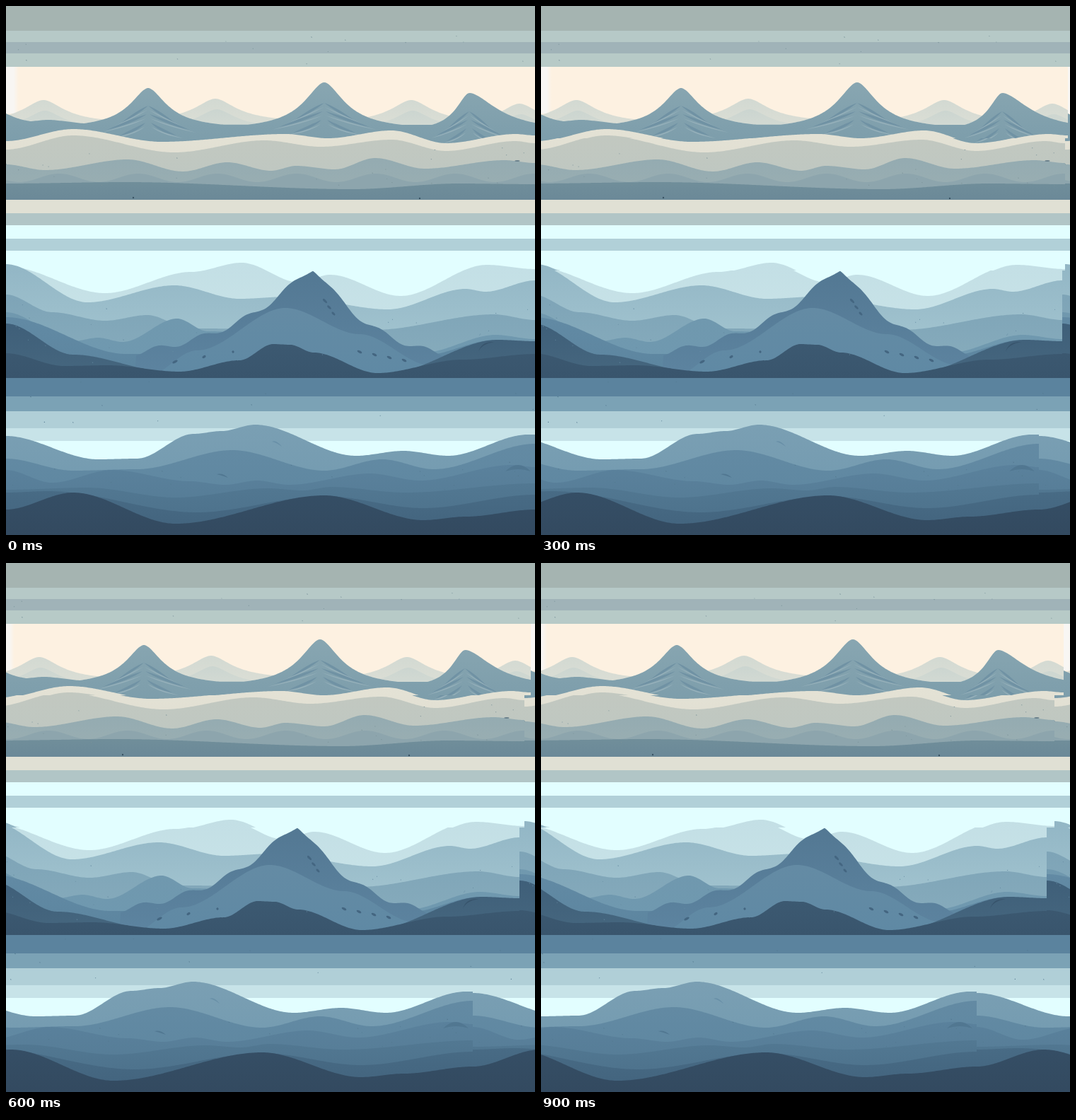
Animation of 748x748 px, one loop 1000 ms. Source, as an HTML page with a canvas:

```html
<!DOCTYPE html>
<html lang="en">
<head>
<meta charset="utf-8">
<title>Layered hills</title>
<style>
html, body { margin: 0; width: 100%; height: 100%; overflow: hidden; background: #a5b4b1; }
canvas { display: block; width: 748px; height: 748px; }
</style>
</head>
<body>
<canvas id="stage" width="748" height="748"></canvas>
<script>
const SIZE = 748, STRIP = SIZE / 4, TAU = Math.PI * 2;
const view = document.getElementById('stage').getContext('2d');
const scene = document.createElement('canvas');
scene.width = scene.height = SIZE;
const g = scene.getContext('2d');

let seed = 41;
const rnd = () => (seed = (seed * 16807) % 2147483647) / 2147483647;

function shade(top, bottom, a, b) {
  const fill = g.createLinearGradient(0, a, 0, b);
  fill.addColorStop(0, top);
  fill.addColorStop(1, bottom);
  return fill;
}

// Stacked flat bands: each starts where the previous one ends.
function bands(y, ...list) {
  for (const [end, color] of list) {
    g.fillStyle = color;
    g.fillRect(0, y, SIZE, end - y);
    y = end;
  }
}

// Height function eased between crests and troughs, given as "x,y x,y ...".
function wave(text) {
  const p = text.split(' ').map(s => s.split(',').map(Number));
  return x => {
    const i = p.findIndex(q => q[0] >= x);
    if (i < 0) return p[p.length - 1][1];
    if (i === 0) return p[0][1];
    const [x0, y0] = p[i - 1], [x1, y1] = p[i];
    const t = (x - x0) / (x1 - x0);
    return y0 + (y1 - y0) * t * t * (3 - 2 * t);
  };
}

// Bell-shaped summit; left and right set how wide each flank is.
function peak(cx, top, height, left, right = left, power = 1.8) {
  return x => {
    const d = Math.abs(x - cx) / (x < cx ? left : right);
    return top + height * (1 - 1 / (1 + d ** power));
  };
}

const highest = (...fns) => x => Math.min(...fns.map(f => f(x)));

function ridge(base, top, bottom, height) {
  const fn = typeof height === 'string' ? wave(height) : height;
  let crest = base;
  g.beginPath();
  g.moveTo(0, base);
  for (let x = 0; x <= SIZE; x += 2) {
    const y = Math.min(fn(x), base);
    crest = Math.min(crest, y);
    g.lineTo(x, y);
  }
  g.lineTo(SIZE, base);
  g.fillStyle = shade(top, bottom, crest, base);
  g.fill();
}

function streak(color, x, y, cx, cy, u, v, w) {
  g.beginPath();
  g.moveTo(x, y);
  g.quadraticCurveTo(cx, cy - w, u, v);
  g.quadraticCurveTo(cx, cy + w, x, y);
  g.fillStyle = color;
  g.fill();
}

function pebble(color, x, y, rx, ry, turn = 0.5) {
  g.beginPath();
  g.ellipse(x, y, rx, ry, turn, 0, TAU);
  g.fillStyle = color;
  g.fill();
}

function specks(count, y, h, color) {
  for (let i = 0; i < count; i++) {
    pebble(color, rnd() * SIZE, y + rnd() * h, 0.5 + rnd() * 0.4, 0.5);
  }
}

// Creases fanning out below a summit, dark and light in turn.
function folds(x, y, k) {
  for (const side of [-1, 1]) {
    for (let i = 0; i < 6; i++) {
      const reach = side * k * (40 + 9 * (i % 4)), drop = y + 25 + 6 * i;
      streak(i % 2 ? '#97b1bb' : '#7092a4', x + side * i, drop,
        x + reach * 0.4, drop + 10, x + reach, drop + 26 - 2 * i, i % 2 ? 1.5 : 4);
    }
  }
}

function paintPeaks() {
  bands(0, [35, '#a5b4b1'], [51, '#b6c9c7'], [67, '#a0b3b8'], [86, '#b7cac7'],
    [274, '#fdf1e1']);
  const edge = g.createLinearGradient(0, 0, 18, 0);
  edge.addColorStop(0.6, '#f8f6f3');
  edge.addColorStop(1, '#fdf1e1');
  g.fillStyle = edge;
  g.fillRect(0, 86, 18, 66);

  const far = [[53, 133], [296, 131], [573, 133], [726, 138]];
  const hills = (dx, dy, h, w) => highest(...far.map(([x, y]) => peak(x + dx, y + dy, h, w)));
  ridge(200, '#d2d9d2', '#e3e2d7', hills(0, 0, 34, 38));
  ridge(200, '#cbd5d0', '#dcdfd6', hills(2, 15, 28, 34));

  ridge(205, '#88a6b1', '#7b9caa', highest(
    peak(-8, 150, 18, 25), peak(60, 161, 10, 50), peak(201, 116, 58, 33),
    peak(450, 108, 68, 36), peak(655, 123, 56, 24, 50),
    x => x < 655 ? 171 : SIZE));
  folds(201, 116, 1);
  folds(450, 112, 1.1);
  folds(655, 124, 0.8);

  ridge(274, '#e4e2d5', '#dddcd0',
    '0,191 95,174 220,192 395,181 455,187 545,176 622,194 720,181 748,183');
  ridge(274, '#c2c8c0', '#bdc7c2',
    '0,203 95,183 238,207 365,190 445,199 545,189 622,205 720,191 748,194');
  ridge(274, '#94abb1', '#9bafb2',
    '0,224 55,232 172,217 250,234 313,221 375,233 410,226 465,231 522,215 592,230 705,218 748,222');
  ridge(274, '#8da5ad', '#8da5ad', x => 243 - 6 * Math.cos((x - 75) / 112 * TAU));
  ridge(274, '#708e9a', '#6b8998', '0,251 170,249 490,259 640,251 748,252');
  specks(24, 200, 60, '#7d949a');
  pebble('#687f8a', 723, 219, 3.5, 0.9, 0);
  pebble('#344d5d', 180, 271, 1.1, 1.1);
  pebble('#344d5d', 585, 272, 1.1, 1.1);
}

function paintValley() {
  bands(274, [293, '#e0e0d4'], [310, '#b1c5c6'], [329, '#e2feff'], [346, '#b1d0d8'],
    [526, '#e2feff']);
  ridge(526, '#c3dfe5', '#cce6ea',
    '0,368 140,406 262,376 333,363 415,391 458,380 558,410 680,366 748,372');
  ridge(526, '#92b6c5', '#a9cad4',
    '0,365 115,419 238,395 330,414 400,411 540,429 650,400 678,404 748,388');
  ridge(526, '#7ea4b7', '#88adbd',
    '0,408 65,433 140,445 200,437 260,456 520,458 690,436 748,444');
  ridge(526, '#7098ae', '#6f99b0',
    '0,433 95,474 130,469 165,475 242,442 285,460 590,490 692,465 748,471');
  ridge(526, '#628aa4', '#5c859f', '0,440 170,492 590,494 692,472 748,476');

  const summit = peak(434, 375, 165, 120, 84, 1.3);
  ridge(526, '#537893', '#5d84a0', x => {
    const d = Math.abs(x - 434);
    return d > 250 ? 526 : summit(x) - 4 - 4 * Math.cos((d - 34) / 62 * TAU);
  });
  ridge(526, '#648ba4', '#5f89a4', '195,526 270,487 395,427 500,464 600,508 640,526');

  const stone = '#446681';
  for (let i = 0; i < 3; i++) pebble(stone, 451 + i * 6, 417 + i * 9, 4 - i * 0.5, 1.6, 0.8);
  for (let i = 0; i < 3; i++) pebble(stone, 239 + i * 41, 503 - i * 7, 4 - i * 1.2, 1.7, -0.5);
  for (let i = 0; i < 4; i++) pebble(stone, 500 + i * 21, 489 + i * 4, 3.6, 1.6);

  ridge(526, '#3f5f79', '#46677f', '0,449 95,493 230,517 540,519 695,472 748,474');
  ridge(526, '#3c5971', '#39556d',
    '0,491 82,509 145,508 245,517 330,501 378,478 402,479 435,490 525,519 645,500 748,492');
  streak('#38546c', 668, 489, 672, 476, 690, 475, 2);
  specks(30, 420, 90, '#668ca2');
}

function paintHills() {
  bands(526, [552, '#5b839e'], [573, '#7ba2b5'], [597, '#b0cfd7'], [615, '#c7e3e8'],
    [SIZE, '#e2feff']);
  ridge(SIZE, '#7a9fb3', '#6f98ae',
    '0,608 130,641 185,640 265,605 305,601 352,592 495,636 562,629 625,636 738,606 748,606');
  ridge(SIZE, '#638aa3', '#5c86a0',
    '0,640 95,657 185,655 320,628 450,657 532,641 605,655 748,619');
  ridge(SIZE, '#5a819c', '#537992',
    '0,656 65,674 150,656 260,672 310,677 355,671 400,677 515,661 585,671 715,649 748,652');
  ridge(SIZE, '#527892', '#4b6f89',
    '0,684 115,681 240,695 370,682 420,685 460,680 565,688 748,675');
  ridge(SIZE, '#486b85', '#42637d', '0,688 60,686 270,716 450,693 590,710 748,691');
  ridge(SIZE, '#354e65', '#334a60', '0,712 95,688 240,732 450,692 590,727 650,722 748,712');
  streak('#688fa7', 376, 616, 382, 615, 390, 623, 2);
  streak('#517791', 298, 662, 306, 662, 314, 667, 2);
  streak('#517791', 706, 658, 724, 646, 742, 658, 6);
  specks(20, 645, 40, '#54798f');
  specks(12, 530, 60, '#54798f');
}

// Each quarter of the picture scrolls left at its own pace and wraps.
const SPEEDS = [0.98, 22 / 9, 11 / 3, 44 / 3];

function draw(now) {
  const step = Math.floor((now % 1000) / 100);
  SPEEDS.forEach((speed, i) => {
    const shift = Math.round(step * speed), y = i * STRIP;
    for (const x of [-shift, SIZE - shift]) {
      view.drawImage(scene, 0, y, SIZE, STRIP, x, y, SIZE, STRIP);
    }
  });
  requestAnimationFrame(t => draw(Math.max(0, t - start)));
}

paintPeaks();
paintValley();
paintHills();
specks(14, 36, 48, '#7d969d');
const start = performance.now();
draw(0);
</script>
</body>
</html>
```
